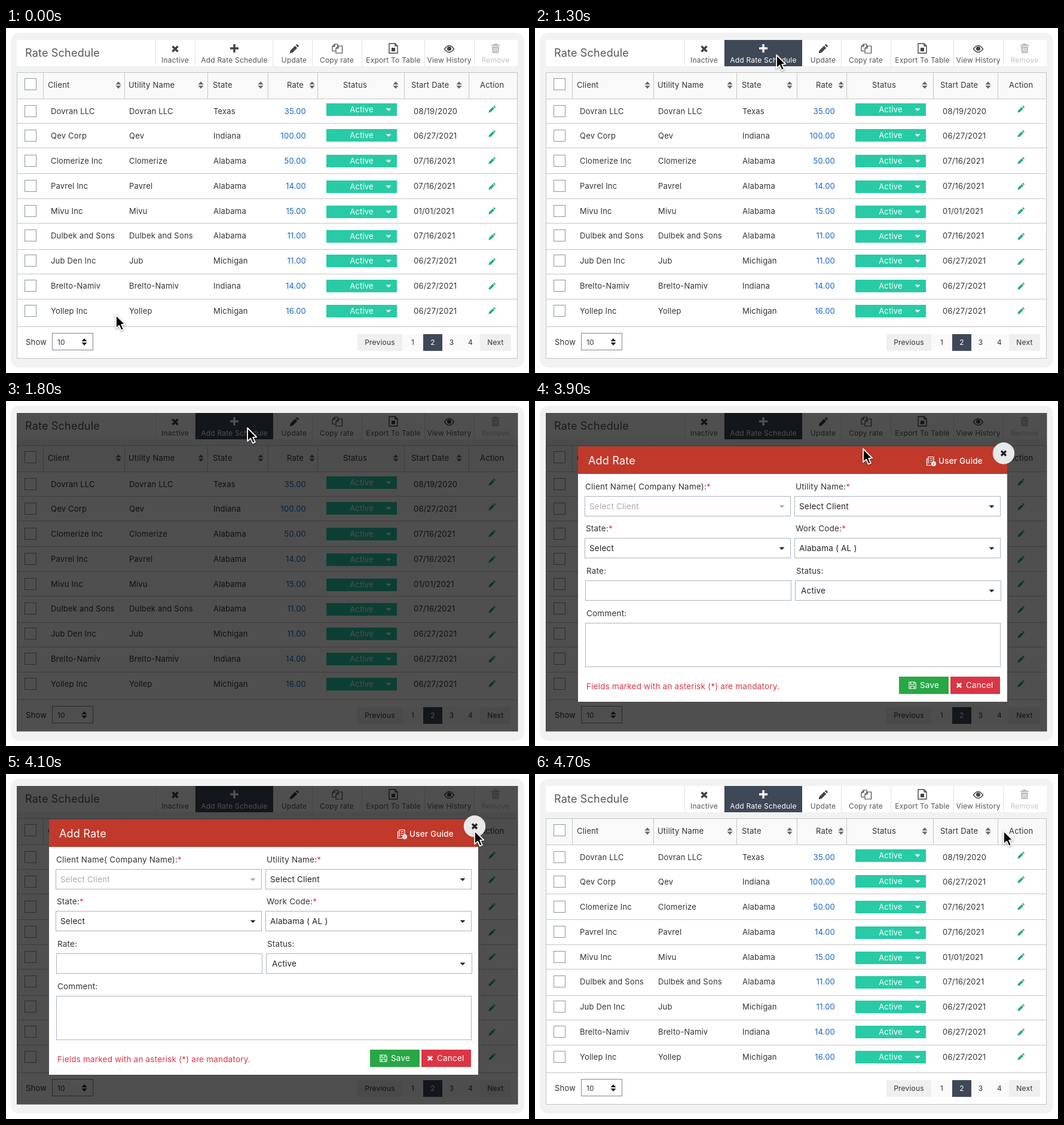
An HTML page for the animation above (4800 ms loop, 875x577 px).

```html
<!DOCTYPE html>
<html lang="en">
<head>
<meta charset="utf-8">
<title>Rate Schedule</title>
<style>
  html, body { margin: 0; width: 100%; height: 100%; overflow: hidden; background: #fff; }
  svg { display: block; width: 100%; height: 100%; }
  text { font: 13px Inter, "Open Sans", sans-serif; letter-spacing: .2px; white-space: pre; fill: #333; }
  text.small { font-size: 12px; }
  text.form { font-size: 13.5px; }
  text.title { font-size: 18px; fill: #555; }
  text.medium { font-weight: 500; }
  .end { text-anchor: end; }
  .mid { text-anchor: middle; }
  #cursor path { fill: #000; stroke: #fff; stroke-width: 1.8; stroke-linejoin: round; filter: drop-shadow(0 1px 1.5px rgba(0, 0, 0, .4)); }
</style>
</head>
<body>
<svg id="stage" viewBox="0 0 875 577"></svg>
<script>
const LOOP = 4800, DARK = '#3f4857', TEAL = '#28cba5', GREEN = '#22b07d', RED = '#dc3545', INK = '#444';

const rows = [
  ['Dovran LLC', 'Dovran LLC', 'Texas', '35.00', '08/19/2020'],
  ['Qev Corp', 'Qev', 'Indiana', '100.00', '06/27/2021'],
  ['Clomerize Inc', 'Clomerize', 'Alabama', '50.00', '07/16/2021'],
  ['Pavrel Inc', 'Pavrel', 'Alabama', '14.00', '07/16/2021'],
  ['Mivu Inc', 'Mivu', 'Alabama', '15.00', '01/01/2021'],
  ['Dulbek and Sons', 'Dulbek and Sons', 'Alabama', '11.00', '07/16/2021'],
  ['Jub Den Inc', 'Jub', 'Michigan', '11.00', '06/27/2021'],
  ['Brelto-Namiv', 'Brelto-Namiv', 'Indiana', '14.00', '06/27/2021'],
  ['Yollep Inc', 'Yollep', 'Michigan', '16.00', '06/27/2021']
];
const rowLines = [118, 159, 200, 243, 285, 326, 370, 411, 453, 499];
const badgeTops = [126, 169, 212, 255, 297, 338, 379, 421, 463];
const pencilYs = [136, 177, 222, 265, 306, 349, 391, 432, 473];
const rowY = i => 139 + 41.75 * i;

// Shape helpers; text and icons are placed by their vertical centre.
const box = (x, y, w, h, fill) => `<rect x="${x}" y="${y}" width="${w}" height="${h}" fill="${fill}"/>`;
const frame = (x, y, w, h, stroke, fill = 'none') =>
  `<rect x="${x + .5}" y="${y + .5}" width="${w - 1}" height="${h - 1}" fill="${fill}" stroke="${stroke}"/>`;
const text = (x, y, words, style = '', fill = '') =>
  `<text x="${x}" y="${y + (style.includes('title') ? 6.4 : 4.6)}" class="${style}" ${fill && `style="fill:${fill}"`}>${words}</text>`;
const solid = (x, y, d, fill, scale = 1) =>
  `<path transform="translate(${x} ${y}) scale(${scale})" d="${d}" fill="${fill}"/>`;
const line = (x, y, d, stroke, width = 1.2) =>
  `<path transform="translate(${x} ${y})" d="${d}" fill="none" stroke="${stroke}" stroke-width="${width}"/>`;

const caret = (x, y, fill) => solid(x, y, 'M-4.5-2h9L0 2.6z', fill);
const sorter = (x, y, fill) => solid(x, y, 'M-4.5-1h9L0-6zM-4.5 1h9L0 6z', fill);
const cross = (x, y, r, color, width) => line(x, y, `M${-r} ${-r}L${r} ${r}M${r} ${-r}L${-r} ${r}`, color, width);
const plus = color => line(382, 34, 'M-7 0H7M0-7V7', color, 3.4);
const pencil = (x, y, fill, scale) =>
  solid(x, y, 'M-7 7l1-4.5 7.5-7.5 3.5 3.5-7.5 7.5zM2.6-6l1-1q1-.8 2 .1l1.3 1.3q.9 1 .1 2l-1 1z', fill, scale);

function toolbar() {
  const labels = [[283, 'Inactive'], [382, 'Add Rate Schedule'], [482, 'Update'], [553.5, 'Copy rate'],
    [648, 'Export To Table'], [741.5, 'View History']];
  return box(18, 20, 838, 44, '#fff') + text(32, 42, 'Rate Schedule', 'title') +
    [250, 316, 446, 512, 595, 700, 783].map(x => box(x, 20, 1, 44, '#e2e2e2')).join('') +
    labels.map(([x, label]) => text(x, 53.5, label, 'small mid', '#555')).join('') +
    text(819, 53.5, 'Remove', 'small mid', '#c2c2c2') +
    cross(283, 35, 4.5, INK, 3.6) + plus(INK) + pencil(482, 35, INK, 1.05) +
    line(554, 34, 'M-3 4.5H-8V-3l4-4H1V-4M-8-3h4v-4M-2 8V0l4-4H8.5V8zM-2 0h4v-4', INK) +
    line(648, 34, 'M-7-8H3l4 4V8H-7zM3-8v4h4', INK, 1.4) + box(645, 33, 6, 6, INK) +
    line(741.5, 35, 'M-8 0Q0-11 8 0Q0 11-8 0z', INK, 1.4) + `<circle cx="741.5" cy="34.5" r="3.6" fill="${INK}"/>` +
    box(812, 28, 14, 2, '#bbb') + box(816, 26, 6, 2, '#bbb') +
    solid(819, 34, 'M-6-3H6L5 8H-5z', '#bbb') +
    line(819, 34, 'M-2.5-1V6M0-1V6M2.5-1V6', '#fff', 1);
}

function table() {
  const headings = [[70, 'Client', 188], [205, 'Utility Name', 326], [346, 'State', 426], [470, 'Rate', 512],
    [564, 'Status', 652], [678, 'Start Date', 758], [793, 'Action']];
  const checkbox = y => frame(31, Math.round(y) - 10, 20, 20, '#899', '#fff');
  return box(18, 74, 838, 479, '#fff') + box(18, 74, 838, 44, '#f9f9f9') +
    rowLines.map(y => box(18, y, 838, 1, '#c6c6c6')).join('') +
    [62, 198, 337, 438, 521, 666, 774].map(x => box(x, 74, 1, 44, '#c6c6c6')).join('') +
    frame(18, 74, 838, 479, '#c0c4c6') + checkbox(94) +
    headings.map(([x, label, arrow]) => text(x, 95, label) + (arrow ? sorter(arrow, 95.5, '#666') : '')).join('') +
    rows.map(([client, utility, state, rate, date], i) => {
      const y = rowY(i);
      return checkbox(y - .4) + text(75, y, client) + text(206, y, utility) + text(347, y, state) +
        text(502, y, rate, 'end', '#1565c8') + text(682, y, date);
    }).join('') +
    badgeTops.map(y => box(536, y, 118, 21, TEAL) + text(595, y + 10.5, 'Active', 'mid', '#fff') +
      caret(640, y + 10.5, '#fff')).join('') +
    pencilYs.map(y => pencil(813, y, GREEN, .8)).join('');
}

function footer() {
  const page = (x, w, label, fill, ink) => box(x, 512, w, 28, fill) + text(x + w / 2, 525.5, label, 'small mid', ink);
  return text(33, 525, 'Show') + frame(77, 510, 69, 29, '#7d8790', '#fff') + text(86, 525, '10', 'small') +
    sorter(131, 525, '#222') +
    page(588, 75, 'Previous', '#efefef') + page(663, 35, '1', '#fafafa') + page(698, 32, '2', DARK, '#fff') +
    page(730, 31, '3', '#fafafa') + page(761, 32, '4', '#fafafa') + page(793, 52, 'Next', '#efefef');
}

function dialog() {
  const label = (x, y, words, required) =>
    text(x, y, words + (required ? `<tspan fill="${RED}">*</tspan>` : ''), 'form');
  const field = (x, y, w, h, value, ink = '#222') => frame(x, y, w, h, '#a9b4bf', '#fff') +
    (value ? text(x + (value === 'Active' ? 10 : 8), y + 17, value, 'form', ink) +
      caret(x < 100 ? 413 : 764, y + 17.5, ink) : '');
  return box(72, 76, 718, 427, '#fff') + box(72, 76, 718, 46, '#c0392b') +
    text(89, 100, 'Add Rate', 'title', '#fff') + text(675, 100.5, 'User Guide', 'form medium', '#fff') +
    line(662, 101, 'M-4 4V-7.5H5V1M-4-4.5H-6.5V6.5H1M-1.5-4.5H3M-1.5-1.5H3M-1.5 1.5H1', '#fff') +
    '<circle cx="667" cy="105" r="4" fill="#fff"/>' + box(666.5, 103, 1, 4, '#c0392b') +
    '<circle cx="784" cy="87.5" r="18.2" fill="#e9e9e9"/>' + cross(784, 87.5, 4, '#222', 3.2) +
    label(84, 143, 'Client Name( Company Name):', true) + label(436, 143, 'Utility Name:', true) +
    field(83, 159, 345, 34, 'Select Client', '#aaa') + field(434, 159, 345, 34, 'Select Client') +
    label(85, 213, 'State:', true) + label(436, 213, 'Work Code:', true) +
    field(83, 229, 345, 34, 'Select') + field(434, 229, 345, 34, 'Alabama ( AL )') +
    label(86, 284, 'Rate:') + label(437, 284, 'Status:') +
    field(84, 300, 345, 34) + field(435, 300, 345, 34, 'Active') +
    label(86, 355, 'Comment:') + field(84, 371, 695, 74) +
    text(86, 477, 'Fields marked with an asterisk (*) are mandatory.', 'form', RED) +
    box(609, 461, 83, 29, '#28a745') + text(644, 475.5, 'Save', 'form', '#fff') +
    line(631.5, 475.5, 'M-5.5-5.5H3.5l2 2V5.5H-5.5zM-3-5.5V-1.5H2.5V-5.5M-3 5.5V1.5H3V5.5', '#fff') +
    box(695, 461, 83, 29, RED) + cross(709.5, 475.5, 3.6, '#fff', 2.8) + text(721, 475.5, 'Cancel', 'form', '#fff');
}

const group = (id, content) => `<g id="${id}">${content}</g>`;
const stage = document.getElementById('stage');
stage.innerHTML =
  '<rect x="8" y="8" width="859" height="560" rx="14" fill="#f2f2f2"/>' + toolbar() + table() + footer() +
  group('hover', box(317, 20, 130, 44, DARK) + plus('#fff') + text(382, 53.5, 'Add Rate Schedule', 'small mid', '#fff')) +
  group('dim', box(18, 20, 838.5, 532.5, 'rgba(0,0,0,.69)')) +
  group('dialog', dialog()) +
  group('cursor', '<path d="M1 2V24.4l5.2-4.8 3.6 8 4-1.8-3.6-7.9 6-.5z"/>');

const part = id => document.getElementById(id);
const hover = part('hover'), dim = part('dim'), modal = part('dialog'), cursor = part('cursor');
const show = (element, on) => { element.style.display = on ? '' : 'none'; };

// Pointer stops: time, x, y.
const stops = [[900, 183, 478], [1300, 403, 43], [3800, 403, 43], [3900, 548, 78], [4100, 783, 93]];

function pointerAt(t) {
  const next = stops.findIndex(([time]) => time > t);
  if (next === 0) return stops[0].slice(1);
  if (next < 0) return stops[stops.length - 1].slice(1);
  const [t0, x0, y0] = stops[next - 1], [t1, x1, y1] = stops[next];
  const k = (t - t0) / (t1 - t0);
  return [x0 + (x1 - x0) * k, y0 + (y1 - y0) * k];
}

function draw(now) {
  const t = Math.floor(now % LOOP / 100) * 100; // the picture advances in tenths of a second
  show(hover, t >= 1300);
  show(dim, t >= 1800 && t < 4700);
  show(modal, t >= 1900 && t < 4600);
  cursor.setAttribute('transform', `translate(${pointerAt(t)})`);
}

const start = performance.now();
function tick() {
  draw(performance.now() - start);
  requestAnimationFrame(tick);
}
tick();
</script>
</body>
</html>
```
